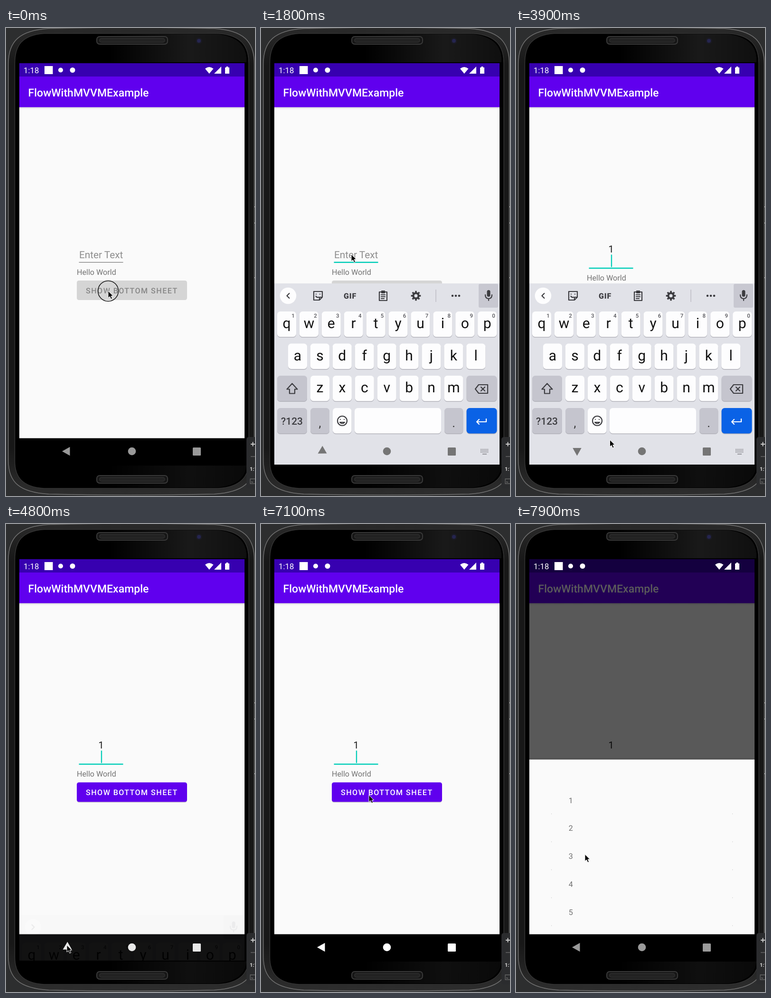
Recreate the animation shown at these times as an HTML page. Size 524x984 px, loop 8000 ms.

```html
<!DOCTYPE html>
<html lang="en">
<head>
<meta charset="utf-8">
<title>Bottom sheet demo</title>
<style>
  html, body { margin: 0; width: 100%; height: 100%; overflow: hidden; background: #2d2e2f; }
  svg { display: block; width: 524px; height: 984px; font-family: Roboto, sans-serif; text-rendering: geometricPrecision; }
  .line { fill: none; stroke: #3c3c40; stroke-width: 2.2; stroke-linecap: round; stroke-linejoin: round; }
</style>
</head>
<body>
<svg viewBox="0 0 524 984" xmlns="http://www.w3.org/2000/svg">
  <defs>
    <linearGradient id="rim" x2="0" y2="1">
      <stop offset="0" stop-color="#2a2a2a"/><stop offset=".08" stop-color="#181818"/>
      <stop offset=".9" stop-color="#181818"/><stop offset="1" stop-color="#2e2e2e"/>
    </linearGradient>
    <linearGradient id="sheen" x2="1" y2="0">
      <stop offset=".4" stop-color="#fff" stop-opacity="0"/><stop offset=".75" stop-color="#fff" stop-opacity=".1"/>
      <stop offset="1" stop-color="#fff" stop-opacity=".06"/>
    </linearGradient>
    <linearGradient id="shade" x2="0" y2="1">
      <stop offset="0" stop-color="#000" stop-opacity=".14"/><stop offset="1" stop-color="#000" stop-opacity="0"/>
    </linearGradient>
    <linearGradient id="lift" x2="0" y2="1">
      <stop offset="0" stop-color="#000" stop-opacity="0"/><stop offset="1" stop-color="#000" stop-opacity=".1"/>
    </linearGradient>
    <clipPath id="screen"><path d="M28 74H502V918H28Z"/></clipPath>
  </defs>

  <!-- phone -->
  <path d="M5 75C5 28 28 5 90 1Q264 -3 438 1C500 5 522.500 28 522.500 75V910C522.500 955 500 976 438 980Q264 984 90 980C28 976 5 955 5 910Z"
    fill="url(#rim)" stroke="#707070" stroke-width="1.500"/>
  <path d="M18.500 75C18.500 35 35 15 80 11.500H447C492 15 511 35 511 75V910C511 945 492 965 447 968H80C35 965 18.500 945 18.500 910Z"
    stroke="#343434" stroke-width="1.500"/>
  <path d="M24 72V62Q26 20 80 13H447Q502 20 506 62V72Z" fill="url(#sheen)"/>
  <path d="M24 920Q28 960 80 966H447Q502 960 506 920Z" fill="url(#sheen)" opacity=".6"/>
  <g id="speakers" fill="#161616" stroke="#393939" stroke-width="2"></g>
  <circle cx="406" cy="27" r="7" fill="#1a1a22"/><circle cx="406" cy="27" r="4" fill="#25254f"/>
  <path d="M523 376h1M523 410h1M523 525h1" stroke="#bbb" stroke-width="2"/>

  <g clip-path="url(#screen)">
    <path d="M28 74H502V863H28Z" fill="#fafafa"/>
    <path d="M28 166H502V171H28Z" fill="url(#shade)"/>
    <path d="M28 102H502V166.500H28Z" fill="#6000ee"/>
    <path d="M28 74H502V102H28Z" fill="#3700b0"/>
    <text x="46.500" y="143.500" font-size="23.040" font-weight="500" fill="#fff">FlowWithMVVMExample</text>

    <text id="hint" x="154" y="484" font-size="20.740" fill="#8e8e8e">Enter Text</text>
    <text id="digit" x="200" y="484" font-size="20.740" fill="#1c1c1c" text-anchor="middle">1</text>
    <path id="caret" d="M201 464V490" stroke="#03cdb8" stroke-width="2.300"/>
    <g id="below">
      <path id="underline" d="M153.500 492.700H246.500"/>
      <text x="149" y="519" font-size="16.130" fill="#737373">Hello World</text>
      <rect id="btnShade" x="149" y="532.500" width="232" height="41" rx="4.500" opacity=".18"/>
      <rect id="btn" x="149" y="531" width="232" height="41" rx="4.500"/>
      <text id="label" x="168" y="558" font-size="16.130" font-weight="500" letter-spacing="1.440">SHOW BOTTOM SHEET</text>
    </g>

    <path id="dim" d="M28 74H502V863H28Z"/>
    <g fill="#fff">
      <text x="37" y="95" font-size="16.800">1:18</text>
      <path d="M81 80H98.500V97H81Z"/>
      <circle cx="115" cy="88.500" r="5"/><circle cx="140" cy="88.500" r="5.500"/>
      <path d="M419 85.500Q427.500 78.500 436.500 85.500L427.700 96ZM453 81V96H438ZM461 83h2.500v-2h4v2h2.500v13h-9Z"/>
    </g>

    <path d="M28 862.500H502V918H28Z"/>
    <g id="sheet">
      <path d="M28 490H502V495H28Z" fill="url(#lift)"/>
      <path d="M28 495.300H502V862.500H28Z" fill="#fafafa"/>
    </g>
    <g id="keyboard"></g>
    <g id="nav">
      <path id="back" d="M-9.500 0L7 -9.200V9.200Z"/>
      <circle cx="265" cy="890" r="8.300"/>
      <rect x="393" y="882" width="17" height="17" rx="1.500"/>
    </g>
  </g>

  <!-- side panel -->
  <rect x="506" y="860" width="30" height="108" rx="5" fill="#2b2c2e"/>
  <path d="M515 875h9M519.500 870.500v9" stroke="#ccc" stroke-width="2"/>
  <path d="M515 901h9" stroke="#666" stroke-width="1.500"/>
  <text x="513" y="931" font-size="11" font-weight="700" fill="#ddd">1:1</text>
  <path d="M524 948H514V958H524M517 953v2h3" fill="none" stroke="#666" stroke-width="1.300"/>

  <g id="pointer">
    <circle id="ring" r="21.500" fill="none" stroke="#111" stroke-width="1.500"/>
    <path d="M0 0V14.500L3.500 11.500L6 17L8.600 15.800L6.200 10.600H10.600Z" stroke="#fff"/>
  </g>
</svg>
<script>
const $ = id => document.getElementById(id);
const set = (id, attrs) => { for (const k in attrs) $(id).setAttribute(k, attrs[k]); };
const clamp = v => Math.max(0, Math.min(1, v));
const ramp = (t, a, b) => clamp((t - a) / (b - a));
const mix = (a, b, k) => a + (b - a) * k;
const show = (id, on) => set(id, { visibility: on ? 'visible' : 'hidden' });

const rect = (x, y, w, h, r, fill) =>
  `<rect x="${x}" y="${y}" width="${w}" height="${h}" rx="${r}" fill="${fill}"/>`;
const text = (x, y, size, s, more = '') =>
  `<text x="${x}" y="${y}" font-size="${size}" text-anchor="middle" ${more}>${s}</text>`;
const icon = (x, y, d, more = '') =>
  `<path class="line" transform="translate(${x} ${y})" d="${d}" ${more}/>`;

$('speakers').innerHTML = [18, 941].map(y =>
  `<rect x="191" y="${y}" width="149" height="16" rx="6"/>
   <rect x="197" y="${y + 4}" width="137" height="8" rx="4" fill="#222" stroke="#2b2b2b"/>`).join('');

$('sheet').innerHTML += [1, 2, 3, 4, 5].map((n, i) => {
  const y = 586.7 + i * 58.75;
  return text(115.3, y, 16.13, n, 'fill="#707070"') +
    rect(74, y + 22, 1.2, 1.5, 0, '#ccc') + rect(455, y + 22, 1.2, 1.5, 0, '#ccc');
}).join('');

function buildKeyboard() {
  const white = '#fdfdfe', grey = '#c5c5ce';
  const key = (x, y, w, fill = white, h = 53.5) =>
    rect(x, y + 1.5, w, h, 6.5, '#b3b3bb') + rect(x, y, w, h, 6.5, fill);
  const row = (letters, x0, y) => [...letters].map((c, i) => {
    const x = x0 + i * 46.9;
    return key(x, y, 40) + text(x + 20, y + 35, 30, c, 'fill="#111"');
  }).join('');
  const hints = [...'1234567890'].map((c, i) =>
    text(67.5 + i * 46.9, 609, 11.5, c, 'fill="#55555a" font-weight="500"')).join('');
  const teeth = [...Array(8)].map((_, i) =>
    `<path d="M-1.8 -10.300h3.600v4h-3.600z" transform="translate(326 563) rotate(${i * 45})"/>`).join('');
  const dots = [...Array(18)].map((_, i) =>
    rect(462 + i % 6 * 2.9, 885 + (i / 6 | 0) * 3, 1.7, 1.7, 0, '#85858a')).join('');
  const tools =
    icon(120, 563, 'M-9 -9H9V3L3 9H-9ZM3 9V3H9M-4 -3.500v.1M4 -3.500v.1M-4.500 1Q-2 4.500 1 3') +
    text(187.5, 568.5, 16, 'GIF', 'font-weight="900" fill="#3c3c40" letter-spacing=".8"') +
    icon(257, 563, 'M-8 -8H8V10H-8ZM-3 -10H3V-6H-3ZM-4 -2H4M-4 2H4M-4 6H2') +
    `<g fill="#3c3c40">${teeth}<circle cx="326" cy="563" r="5.500" fill="none" stroke="#3c3c40" stroke-width="4"/></g>` +
    rect(367.3, 550, 1.4, 26, 0, '#bbbbc2') +
    [403, 410, 417].map(x => `<circle cx="${x}" cy="563" r="2.300" fill="#3c3c40"/>`).join('');

  return rect(28, 537, 474, 381, 0, '#e1e2e8') +
    rect(458, 538, 41, 50, 3, '#c8c8d1') +
    `<circle cx="57" cy="563" r="17.300" fill="${white}"/>` +
    icon(57, 563, 'M2.500 -5L-2.500 0L2.500 5', 'id="chevron"') +
    `<g id="tools">${tools}</g>` +
    rect(475.5, 551, 7, 14, 3.5, '#3c3c40') +
    icon(479, 562, 'M-7 -1Q-7 7 0 7Q7 7 7 -1M0 7V11') +
    row('qwertyuiop', 34, 596) + hints + row('asdfghjkl', 57, 663.5) + row('zxcvbnm', 104, 731) +
    key(34, 731, 63, grey) + icon(65.5, 758.5, 'M0 -11L11 1H5.500V10H-5.500V1H-11Z') +
    key(432.5, 731, 64, grey) + icon(464, 759, 'M-13 0L-6 -9H13V9H-6ZM-1 -4L7 4M7 -4L-1 4') +
    key(34, 799, 63, grey) + text(65, 834, 21, '?123', 'fill="#3c3c40" font-weight="500"') +
    key(104, 799, 40, grey) + text(124, 839, 25, ',', 'fill="#333"') +
    key(151, 799, 39.5) +
    icon(171, 826, 'M10 0A10 10 0 1 1 -10 0A10 10 0 1 1 10 0M-4 -3v.1M4 -3v.1M-5 3Q0 8.500 5 3Z') +
    key(197, 799, 182) + key(386, 799, 39.5, grey) + text(405.5, 839, 25, '.', 'fill="#333"') +
    key(432.5, 799, 64, '#0a62e6') +
    icon(464, 827, 'M10 -5V1H-10M-5 -4L-10 1L-5 6', 'style="stroke:#fff"') +
    dots + rect(466, 895, 9, 1.6, 0, '#85858a');
}
$('keyboard').innerHTML = buildKeyboard();

// time, x, y of the mouse pointer
const route = [[0, 215, 553], [300, 215, 553], [900, 190, 476], [3000, 190, 476], [3600, 197, 832],
  [3900, 197.5, 866], [4300, 128, 885.5], [4900, 128, 885.5], [5400, 222, 574], [6000, 227, 570],
  [7500, 227, 570], [7900, 145, 694.5]];
const clicks = [[0, 200], [1100, 1300], [4400, 4600], [6200, 6400]];

function pointerAt(t) {
  const i = route.findIndex(p => p[0] > t);
  if (i < 0) return route[route.length - 1].slice(1);
  const [a, b] = [route[i - 1], route[i]];
  const k = ramp(t, a[0], b[0]), e = k * k * (3 - 2 * k);
  return [mix(a[1], b[1], e), mix(a[2], b[2], e)];
}

function draw(t) {
  const focused = t >= 1200, typed = t >= 2300, wrapped = t >= 2800;
  const blinkFrom = wrapped ? 2800 : typed ? 2300 : 1200;
  show('hint', !typed);
  show('digit', typed);
  set('digit', { y: wrapped ? 472 : 484 });
  show('caret', focused && t < 7300 && Math.floor((t - blinkFrom) / 500) % 2 === 0);
  set('caret', { transform: `translate(${typed && !wrapped ? 6 : 0} ${wrapped ? 12.5 : 0})` });
  set('below', { transform: `translate(0 ${wrapped ? 12.3 : 0})` });
  set('underline', { stroke: focused ? '#03cdb8' : '#777', 'stroke-width': focused ? 2.4 : 1.2 });
  set('btn', { fill: typed ? '#6000ee' : '#d5d5d5' });
  set('label', { fill: typed ? '#fff' : '#868686' });
  show('btnShade', typed);

  // keyboard
  const opening = 1 - (1 - ramp(t, 1400, 1800)) ** 2;
  const closing = ramp(t, 4600, 4815);
  const shown = opening * (1 - closing);
  set('keyboard', { opacity: shown, transform: `translate(0 ${(1 - shown) * 306})` });
  set('tools', { opacity: 1 - ramp(t, 4600, 4800) });
  set('chevron', { transform: `translate(57 563) scale(${closing > 0.5 ? -1 : 1} 1)` });

  // navigation bar
  const rest = t < 3000 ? 153 : mix(255, 154, ramp(t, 7400, 7800));
  const tone = Math.round(mix(rest, 117, t < 3000 ? opening : 1 - ramp(t, 4600, 4840)));
  set('nav', { fill: `rgb(${tone},${tone},${tone})` });
  const turn = ramp(t, 1700, 2000) - ramp(t, 4700, 4850);
  set('back', { transform: `translate(${127.5 + turn} 890) rotate(${-90 * turn})` });

  // bottom sheet
  const settle = ramp(t, 7400, 7600);
  show('sheet', t >= 7300);
  set('sheet', { opacity: mix(0.81, 1, settle), transform: `translate(0 ${30 * (1 - settle) ** 2})` });
  set('dim', { opacity: t < 7300 ? 0 : mix(0.265, 0.645, settle) });

  set('pointer', { transform: `translate(${pointerAt(t)})` });
  show('ring', clicks.some(([a, b]) => t >= a && t < b));
}

const start = performance.now();
function tick() {
  const t = (performance.now() - start) % 8000;
  draw(Math.floor(t / 100) * 100);
  requestAnimationFrame(tick);
}
tick();
</script>
</body>
</html>
```
